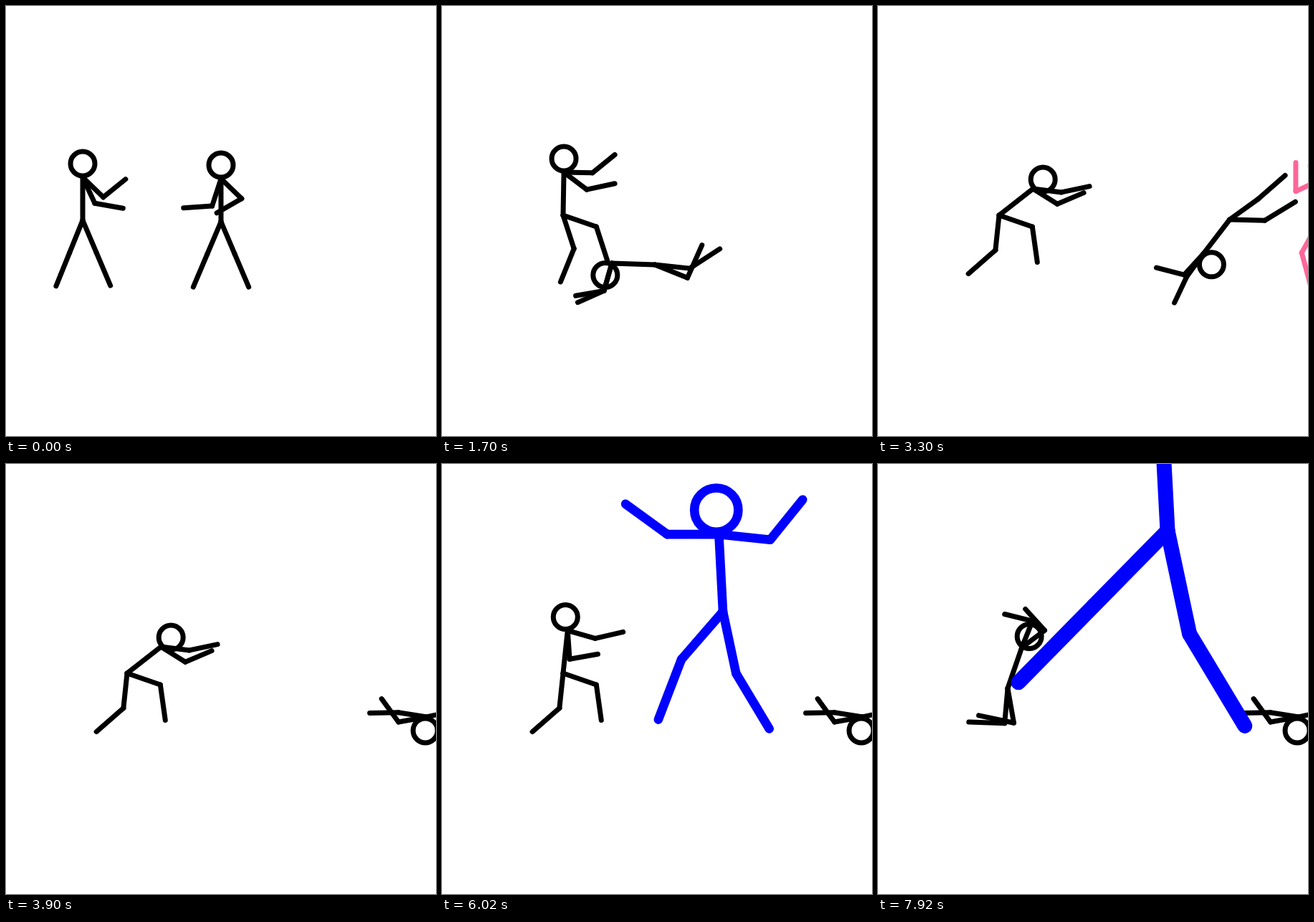
Recreate the animation shown at these times as an HTML page with a canvas. Size 600 px wide and 600 px high, loop 8000 ms.

```html
<!DOCTYPE html>
<html lang="en">
<head>
<meta charset="utf-8">
<title>Stick fight</title>
<style>
html, body { margin: 0; width: 100%; height: 100%; overflow: hidden; background: #fff; }
canvas { display: block; }
</style>
</head>
<body>
<canvas id="stage" width="600" height="600"></canvas>
<script>
const ctx = document.getElementById('stage').getContext('2d');
const LOOP = 8000;

// One skeleton for everybody: spine, head, two arms, two legs, joint 0 is the hip
const PARENT = [0, 1, 1, 3, 1, 5, 0, 7, 0, 9];
const LENGTH = [60, 19, 40, 40, 40, 40, 49, 50, 49, 50];

// Each key names only what changes; angles are in degrees, clockwise from the right
function timeline(keys) {
  let pose = { size: 1 };
  return keys.map(([time, change]) => ({ time, ...(pose = { ...pose, ...change }) }));
}

const swap = ([a, b, c, d]) => [c, d, a, b];

// Steps that exchange the left and right limbs, ending in the given pose
const strides = (count, time, beat, pose, dx) => Array.from({ length: count }, (_, n) => {
  const left = count - 1 - n, { at: [x, y], arms, legs } = pose;
  const flip = left % 2 ? swap : v => v;
  return [time + n * beat, { ...pose, at: [x - dx * left, y], arms: flip(arms), legs: flip(legs) }];
});

const hero = timeline([
  [0, { at: [107, 299], spine: [-90, -90], arms: [44, -39, 65, 10], legs: [112, 112, 67, 67] }],
  [500, { at: [108, 303], legs: [118, 112, 62, 85] }],
  [1200, { at: [160, 240], legs: [92, 130, -12, 5] }],
  [1700, { at: [169, 292], spine: [-89, -90], arms: [1, -39, 37, -12], legs: [72, 112, 19, 72] }],
  [2200, { spine: [30, 25], arms: [70, 85, 95, 75], legs: [96, 139, 19, 82] }],
  [2700, { spine: [-17, -22], arms: [28, 10, 52, -1] }],
  [3300, { spine: [-38, -43], arms: [7, -12, 32, -23] }],
  [4000, {}],
  [4700, { spine: [-91, -107], arms: [16, -13, 86, -10] }],
  [5400, {}],
  [6020, { spine: [-84, -99] }],
  [6320, {}],
  [6920, { at: [181, 313], spine: [-71, -70], arms: [16, -13, 46, -31], legs: [95, 182, 80, 192] }],
  [7420, {}],
  [7920, { spine: [-71, -56], arms: [-37, 228, -68, 194] }]
]);

const rival = timeline([
  [0, { at: [300, 301], spine: [-90, -90], arms: [44, 150, 108, 176], legs: [67, 67, 113, 113] }],
  [500, { arms: [155, 190, 108, 176] }],
  [900, { spine: [-98, -98] }],
  [1600, { at: [297, 361], spine: [182, 119], arms: [106, 170, 106, 156], legs: [6, -33, 22, -66] }],
  [1800, {}],
  [2700, { at: [287, 240], spine: [75, -3], arms: [42, 30, 82, 142], legs: [-10, -100, -77, -116] }],
  [2900, { at: [301, 222] }],
  [3600, { at: [633, 355], spine: [167, 96], arms: [189, 179, 170, 234], legs: [10, 20, -5, 15] }],
  [3900, { at: [645.5, 339.5] }]
]);

const runner = timeline([
  ...strides(5, 1800, 225, {
    at: [504, 283], spine: [-112, -114], arms: [155, -90, -4, 72], legs: [119, 75, 52, 17]
  }, -36),
  [3100, { at: [490, 283] }],
  [3500, { at: [740, 320], spine: [-60, -60] }]
]);

const giant = timeline([
  ...strides(4, 4900, 230, {
    at: [392, 258], spine: [-93, -96], arms: [60, 75, 120, 105], legs: [78, 59, 131, 111]
  }, -30),
  [5820, { arms: [6, -51, 180, 216] }],
  [6020, { at: [392, 206], size: 1.8 }],
  [6220, { at: [404, 93], size: 3 }],
  [6520, {}],
  [7020, { legs: [78, 59, 126, 56] }],
  [7420, { legs: [78, 59, 124, 48] }],
  [7820, { legs: [78, 59, 134.5, 134.5] }]
]);

const CAST = [
  { color: '#000', keys: rival },
  { color: '#000', keys: hero },
  { color: '#ff6699', keys: runner },
  { color: '#00f', keys: giant }
];

const mix = (a, b, k) => a + (b - a) * k;
const shortTurn = (a, b) => ((b - a + 540) % 360 + 360) % 360 - 180;
const angles = p => [...p.spine, ...p.arms, ...p.legs];

function drawFigure({ color, keys }, t) {
  const i = keys.findLastIndex(key => key.time <= t);
  if (i < 0) return;
  const a = keys[i], b = keys[i + 1] || a;
  const k = b === a ? 0 : (t - a.time) / (b.time - a.time);
  const size = mix(a.size, b.size, k);
  const joints = [a.at.map((v, n) => mix(v, b.at[n], k))];
  const goal = angles(b);

  ctx.strokeStyle = color;
  ctx.lineWidth = 7 * size;
  angles(a).forEach((angle, n) => {
    const [x, y] = joints[PARENT[n]];
    const turn = (angle + shortTurn(angle, goal[n]) * k) * Math.PI / 180;
    const reach = LENGTH[n] * size;
    const end = [x + reach * Math.cos(turn), y + reach * Math.sin(turn)];
    joints.push(end);
    ctx.beginPath();
    if (n === 1) {
      ctx.arc(...end, 17 * size, 0, 2 * Math.PI);
    } else {
      ctx.moveTo(x, y);
      ctx.lineTo(...end);
    }
    ctx.stroke();
  });
}

// Poses are held for about a tenth of a second
function hold(t) {
  const [from, beat] = t < 4600 ? [0, 100] : t < 5320 ? [4600, 90] : [5320, 100];
  return from + Math.floor((t - from) / beat) * beat;
}

const start = performance.now();
function frame(now) {
  const t = hold(Math.max(0, now - start) % LOOP);
  ctx.fillStyle = '#fff';
  ctx.fillRect(0, 0, 600, 600);
  ctx.lineCap = 'round';
  CAST.forEach(figure => drawFigure(figure, t));
  requestAnimationFrame(frame);
}
frame(start);
</script>
</body>
</html>
```
